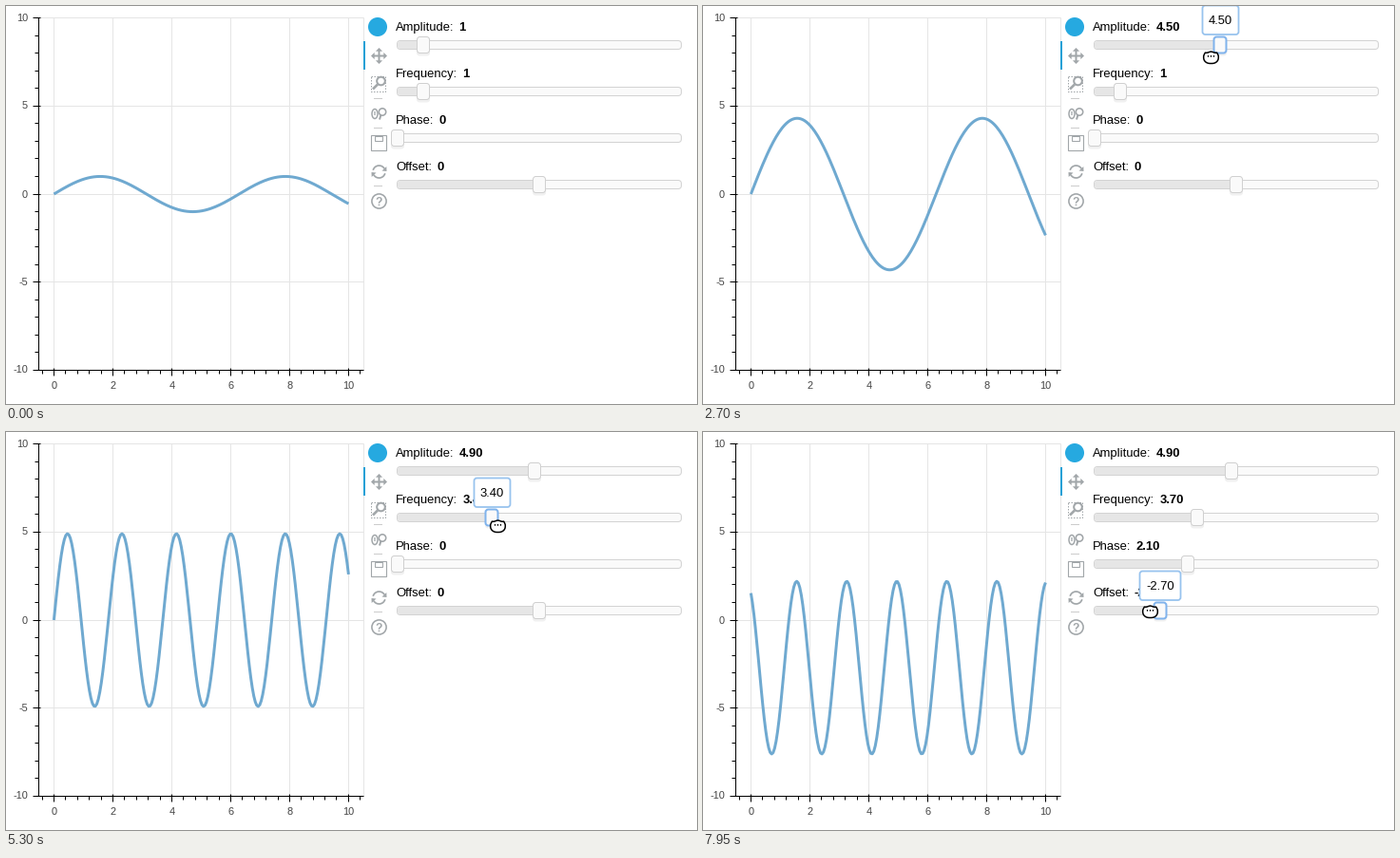
Animation, 727 px wide and 419 px high, one loop 8000 ms. Source, as a matplotlib script:

```python
import numpy as np
import matplotlib.pyplot as plt
from matplotlib.animation import FuncAnimation
from matplotlib.patches import Arc, Circle, Ellipse, FancyBboxPatch, Polygon, Rectangle

W, H = 727, 419
STEP, LOOP = 50, 8000
GREY, GRID, BLUE = "#a1a6a9", "#e5e5e5", "#80b3ec"

plt.rcParams["font.family"] = "Liberation Sans"
# At 72 dpi one point is one pixel.
fig = plt.figure(figsize=(W / 72, H / 72), dpi=72, facecolor="white")
ax = fig.add_axes([0, 0, 1, 1])
ax.set(xlim=(0, W), ylim=(H, 0))
ax.axis("off")


def crisp(v):
    """Centre of the pixel that holds v."""
    return np.floor(v) + 0.5


def line(xs, ys, color="black", lw=1, z=1, **kw):
    kw.setdefault("solid_capstyle", "butt")
    return ax.plot(xs, ys, color=color, lw=lw, zorder=z, snap=False, **kw)[0]


def put(patch):
    patch.set_snap(False)
    return ax.add_patch(patch)


def text(x, y, s, size=13, z=3, **kw):
    return ax.text(x, y, s, size=size, zorder=z, va="baseline", **kw)


def box(x, y, w, h, r, fc, ec, z, **kw):
    style = f"round,pad=0,rounding_size={r}"
    return put(FancyBboxPatch((x, y), w, h, boxstyle=style, fc=fc, ec=ec, zorder=z, **kw))


def smooth(s):
    s = np.clip(s, 0, 1)
    return s ** 3 * (10 - 15 * s + 6 * s * s)


# ---- plot ----
LEFT, RIGHT, TOP, BOTTOM = 34.5, 376.5, 12.5, 383.5


def px(x):
    return 50.4 + 31 * x


def py(y):
    return 198 - 18.55 * y


def draw_plot():
    for x in range(0, 11, 2):
        gx = crisp(px(x))
        line([gx, gx], [TOP, BOTTOM], GRID)
        line([gx, gx], [BOTTOM - 2, BOTTOM + 6], z=3)
        text(gx, 403, str(x), 11, ha="center", color="#444444")
    for y in range(-10, 11, 5):
        gy = crisp(py(y))
        line([LEFT, RIGHT], [gy, gy], GRID)
        line([LEFT - 6, LEFT + 2], [gy, gy], z=3)
        text(23, gy + 3, str(y), 11, ha="right", color="#444444")
    for x in np.arange(-0.4, 10.5, 0.4):
        line([crisp(px(x))] * 2, [BOTTOM, BOTTOM + 4], z=3)
    for y in range(-10, 11):
        line([LEFT - 4, LEFT], [crisp(py(y))] * 2, z=3)
    line([RIGHT, RIGHT], [TOP, BOTTOM], GRID)
    line([LEFT, LEFT], [TOP, BOTTOM + 0.5], z=3)
    line([LEFT, RIGHT], [BOTTOM, BOTTOM], z=3)


# ---- toolbar ----
def ring(x, y, r, lw=1.8, fc="none"):
    put(Circle((x, y), r, fc=fc, ec=GREY, lw=lw, zorder=3))


def frame(x, y, w, h, **kw):
    put(Rectangle((x, y), w, h, fc="none", ec=GREY, **kw))


def draw_toolbar():
    cx = 392.5
    put(Circle((391, 22), 10, fc="#26a9e0", ec="none"))
    line([377, 377], [37, 67], "#1ea0d6", 2, 3)
    for y in (97.5, 128.5, 189.5):
        line([387, 396], [y, y], "#cccccc")

    # pan
    head = np.array([[8.5, 0], [4.8, -3.6], [4.8, 3.6]])
    for a in np.arange(4) * np.pi / 2:
        c, s = np.cos(a), np.sin(a)
        line([cx, cx + 6 * c], [52.5, 52.5 + 6 * s], GREY, 2)
        put(Polygon(head @ [[c, s], [-s, c]] + [cx, 52.5], fc=GREY, ec="none"))

    # box zoom
    frame(384.5, 74.5, 15, 16, lw=1, ls=(0, (1.5, 1.5)))
    line([391, 386], [82.5, 87.5], GREY, 2.6, 3)
    ring(394.5, 79, 4.3, 2, "white")

    # wheel zoom
    put(Ellipse((388, 113.5), 6, 10, fc="none", ec=GREY, lw=1.5))
    line([388, 388], [111, 115], GREY, 1.3)
    line([394.5, 393], [114.5, 119.5], GREY, 2)
    ring(396, 111.5, 3.7, 1.6, "white")

    # save
    frame(384.5, 136.5, 16, 16, lw=1.1)
    frame(388.5, 137.5, 8, 5, lw=1)

    # reset
    for turn, sign in ((0, 1), (180, -1)):
        put(Arc((cx, 174.5), 13, 13, theta1=turn + 195, theta2=turn + 330, ec=GREY, lw=1.7))
        tip = np.array([[8, -0.5], [7.8, -5.5], [3, -1]]) * sign
        put(Polygon(tip + [cx, 174.5], fc=GREY, ec="none"))

    # help
    ring(cx, 205.5, 7.6, 1.6)
    text(cx, 210, "?", 12, color=GREY, weight="bold", ha="center")


# ---- sliders ----
class Slider:
    """A slider dragged through (time, value) keys, eased between them."""

    def __init__(self, row, name, lo, hi, hover, release, *keys):
        self.lo, self.hi, self.hover, self.release = lo, hi, hover, release
        self.keys, self.press = keys, keys[0][0]
        y = 41 + 49 * row
        self.grip_y = y + 13 - 4 * row
        label = text(410.3, y - 15, name + ":")
        value_x = label.get_window_extent().x1 + 4.8
        self.value_text = text(value_x, y - 15, "", weight="bold")
        box(411.5, y - 4.5, 299, 9, 3.5, "#fafafa", "#d3d3d3", 2, lw=1)
        self.fill = box(412, y - 4, 10, 8, 3, "#e6e6e6", "none", 2.1)
        self.shadow = box(0, y - 6.5, 14, 18, 3, "black", "none", 3.9, alpha=0.06)
        self.handle = box(0, y - 8.5, 13, 17, 3, "#fafafa", "#d0d0d0", 4)
        self.tip = box(0, y - 41.5, 39, 30.5, 3, "white", "#aaaaaa", 6)
        self.tip_text = text(0, y - 22, "", z=7, ha="center")

    def value(self, t):
        v = self.keys[0][1]
        for (t0, v0), (t1, v1) in zip(self.keys, self.keys[1:]):
            v += (v1 - v0) * smooth((t - t0) / (t1 - t0))
        return round(float(v), 1)

    def x(self, t):
        return 412 + 298 * (self.value(t) - self.lo) / (self.hi - self.lo)

    def grip(self, t):
        """The pointer runs a little ahead of the handle."""
        ahead = np.clip(self.x(t + 150) - self.x(t - 150), -10, 10)
        return np.array([self.x(t) + ahead, self.grip_y])

    def update(self, t, focused):
        x = round(self.x(t))
        label = f"{self.value(t):.2f}" if t > self.press else str(self.keys[0][1])
        self.value_text.set_text(label)
        self.fill.set_width(max(x - 412, 1))
        self.shadow.set_x(x - 7)
        self.handle.set_x(x - 6.5)
        self.handle.set(ec=BLUE if focused else "#d0d0d0", lw=2 if focused else 1)

        shown = self.hover <= t <= self.release
        drag = self.press <= t < self.release
        narrow = {".": 3.6, "-": 4.3}
        w = round(13 + sum(narrow.get(c, 7.23) for c in label))
        self.tip.set_x(crisp(x - w / 2))
        self.tip.set_width(w)
        self.tip.set(visible=shown, ec="#98c3ee" if drag else "#b0b0b0",
                     lw=1.8 if drag else 1.2)
        self.tip_text.set(visible=shown, text=label, x=x)


draw_plot()
draw_toolbar()

sliders = [
    Slider(0, "Amplitude", 0.1, 10, 800, 3750,
           (1450, 1), (1900, 3.7), (2400, 5.9), (2850, 4.15), (3500, 4.9)),
    Slider(1, "Frequency", 0.1, 10, 4400, 5650, (4500, 1), (5300, 3.4), (5600, 3.7)),
    Slider(2, "Phase", 0, 6.4, 5950, 6850, (6050, 0), (6400, 0.5), (6700, 2.1)),
    Slider(3, "Offset", -5, 5, 7250, LOOP, (7450, 0), (7950, -2.7)),
]

xs = np.linspace(0, 10, 200)
curve = line(px(xs), py(xs), "#6fa9d0", 3, 5, solid_joinstyle="round")

# ---- mouse pointer ----
ENTER, ENTRY, GLIDE = 450, np.array([681, 72]), 300
ARROW = np.array([(0, 0), (0, 16), (3.7, 12.6), (6.4, 19), (9, 18), (6.3, 11.8), (11.3, 11.8)])


def hand(reach):
    """A rounded fist with finger bumps along its top edge."""
    a = np.linspace(0, 2 * np.pi, 73)
    c, s = np.cos(a), np.sin(a)
    x = 7.8 * np.sign(c) * np.abs(c) ** 0.7 * (1 - 0.25 * np.clip(s, 0, 1))
    y = 6 * np.sign(s) * np.abs(s) ** 0.6
    y = np.where(s < 0, reach * (y + 0.9 * np.abs(np.sin(4 * a)) - 0.5), y)
    return np.column_stack([x, y])


FIST, PALM = hand(1), hand(1.4)
KNUCKLES = np.array([p for x in (-3, 0, 3) for p in ((x, -2.5), (x, -0.8), (np.nan, 0))])

pointer = put(Polygon(ARROW, fc="white", ec="black", lw=1.5, zorder=9, joinstyle="round"))
knuckles = line([], [], "black", 1.2, 10)


def move_pointer(t):
    start, begin = ENTER, ENTRY
    for s in sliders:
        if t < s.release:
            break
        start, begin = s.release, s.grip(s.release)
    over = t >= s.hover
    shape = ARROW if not over else PALM if t < s.press else FIST
    at = begin + (s.grip(t) - begin) * smooth((t - start) / GLIDE)
    at = crisp(at)
    pointer.set_xy(shape + at)
    pointer.set_visible(t >= ENTER)
    knuckles.set_data(*(KNUCKLES + at).T)
    knuckles.set_visible(over)


def draw(i):
    t = i * STEP
    pressed = [s for s in sliders if t >= s.press]
    for s in sliders:
        s.update(t, s in pressed[-1:])
    # The curve runs one step ahead of the slider widgets.
    a, k, w, b = (s.value(t + STEP) for s in sliders)
    curve.set_ydata(py(a * np.sin(k * xs + w) + b))
    move_pointer(t)
    return []


anim = FuncAnimation(fig, draw, frames=LOOP // STEP, interval=STEP,
                     repeat=True, repeat_delay=0, blit=False)
plt.show()
```
